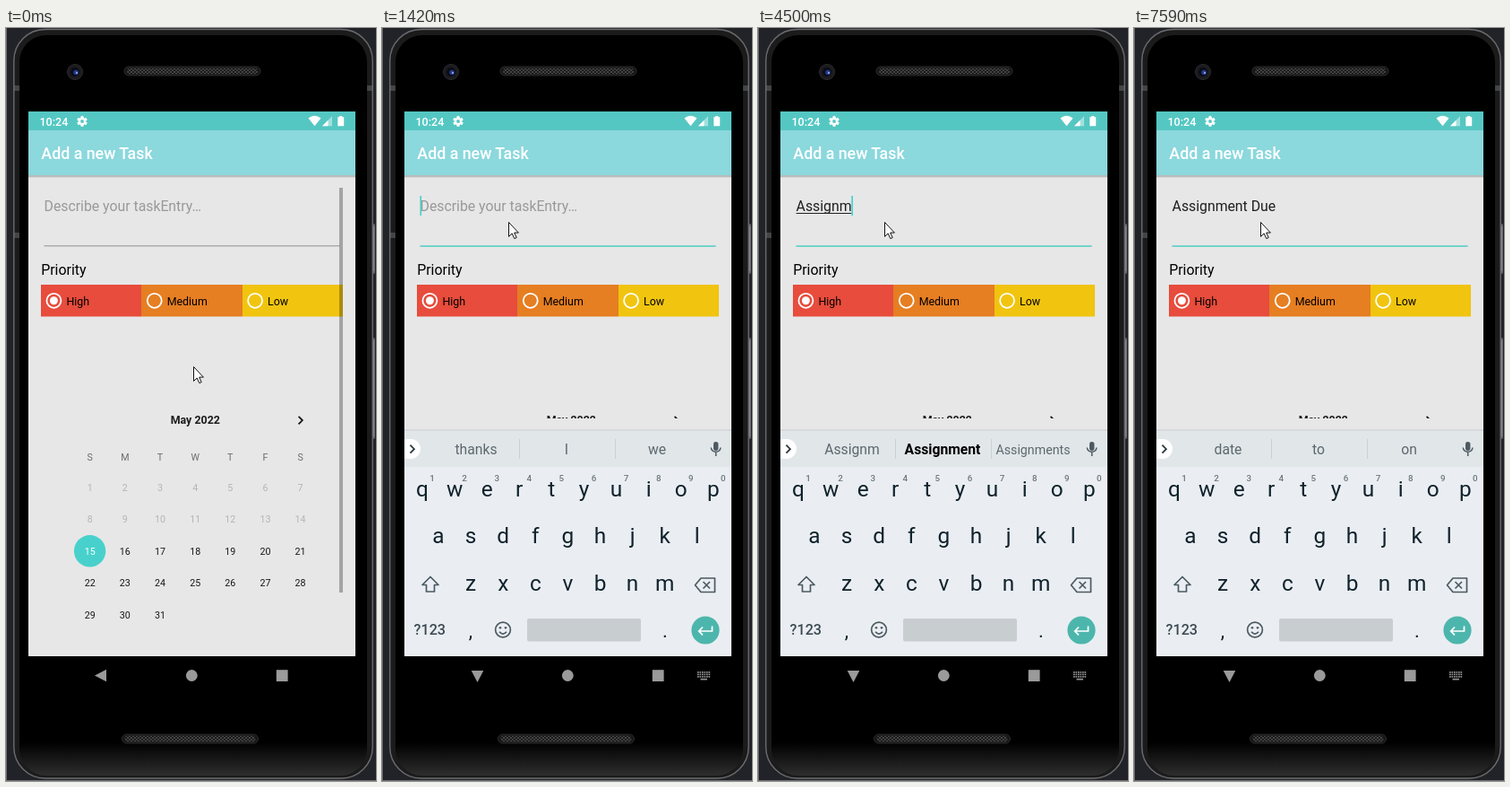
An HTML page for the animation above (8 s loop, 413 px wide and 839 px high).

```html
<!DOCTYPE html>
<html lang="en">
<head>
<meta charset="utf-8">
<title>Add a new Task</title>
<style>
  html, body { margin: 0; width: 100%; height: 100%; overflow: hidden; background: #222329; }
  svg { display: block; width: 413px; height: 839px; }
  text { font-family: Roboto, "Noto Sans", sans-serif; white-space: pre; }
  .mid { text-anchor: middle; }
  .line { fill: none; stroke-width: 1.7; }
</style>
</head>
<body>
<svg id="stage" viewBox="0 0 413 839" xmlns="http://www.w3.org/2000/svg"></svg>
<script>
const LOOP = 8000;
const stage = document.getElementById('stage');

const rect = (x, y, w, h, fill, extra = '') =>
  `<rect x="${x}" y="${y}" width="${w}" height="${h}" fill="${fill}" ${extra}/>`;
const circle = (x, y, r, fill, extra = '') =>
  `<circle cx="${x}" cy="${y}" r="${r}" fill="${fill}" ${extra}/>`;
const path = (d, fill, extra = '') => `<path d="${d}" fill="${fill}" ${extra}/>`;
const line = (d, stroke, extra = '') => `<path class="line" d="${d}" stroke="${stroke}" ${extra}/>`;
const label = (x, y, size, fill, str, extra = '') =>
  `<text x="${x}" y="${y}" font-size="${size}" fill="${fill}" ${extra}>${str}</text>`;
const centred = (x, y, size, fill, str, extra = '') =>
  label(x, y, size, fill, str, `class="mid" ${extra}`);

function phone() {
  const edgeMark = (x, y) => rect(x, y, 6, 6, '#77787a', 'opacity=".45"');
  const speaker = (x, y) =>
    rect(x, y, 152, 10, '#161616', 'rx="5" stroke="#343434" stroke-width=".8"') +
    rect(x + 3, y + 1.5, 146, 7, 'url(#mesh)', 'rx="3.5"');
  const button = (y, h) =>
    rect(406, y, 6, h, '#66676a', 'rx="2"') + rect(408.5, y + 3, 2, h - 6, '#a2a3a5');
  return rect(0, 0, 413, 839, '#222329') +
    rect(0, 0, 1, 839, '#6e6e70') + rect(0, 838, 413, 1, '#6e6e70') +
    button(218, 56) + button(345, 113) +
    rect(8.8, 1.5, 400.4, 834.5, '#1b1b1c', 'rx="35" stroke="#6c6c6e" stroke-width="1.4"') +
    rect(15, 8, 388, 825, 'url(#glass)', 'rx="30"') +
    edgeMark(9, 64) + edgeMark(403, 64) + edgeMark(9, 228) +
    speaker(132, 43) + speaker(129.5, 787) +
    circle(77, 49, 8.5, '#1b1b1d', 'stroke="#2c2c2e"') + circle(77, 49, 5, '#090b18') +
    circle(78, 49.5, 2.8, '#263a85') + circle(79, 50, 1.2, '#7f9bea');
}

function statusBar() {
  let teeth = '';
  for (let a = 0; a < 360; a += 60)
    teeth += rect(83.6, 98.3, 2.8, 11.4, '#fff', `rx=".6" transform="rotate(${a} 85 104)"`);
  return rect(25, 93, 365, 21, '#55c7c2') + rect(25, 114, 365, 50, '#8bd8dd') +
    rect(25, 164, 365, 2, '#b9bdbd') + rect(25, 166, 365, 1, '#d6d7d7') +
    label(37.5, 108.5, 12.5, '#fff', '10:24', 'font-weight="500"') +
    teeth + circle(85, 104, 4.3, '#fff') + circle(85, 104, 1.9, '#55c7c2') +
    path('M337.5 100.5Q344.5 95 351.5 100.5L344.5 109.3Z', '#fff') +
    path('M353 109.2L364 98.2V109.2Z', '#fff', 'opacity=".45"') +
    path('M353 109.2L359.5 102.7V109.2Z', '#fff') +
    path('M370.3 99.3H372.2V98H375.3V99.3H377.2V109.3H370.3Z', '#fff') +
    label(39.3, 146, 17.8, '#fff', 'Add a new Task', 'font-weight="500"');
}

function priorities() {
  const options = [['High', '#e74c3c'], ['Medium', '#e67e22'], ['Low', '#f1c40f']];
  const edge = i => 39 + i * 112.33;
  return label(39.2, 274.6, 15.9, '#000', 'Priority') + options.map(([name, fill], i) => {
    const left = Math.round(edge(i)), x = edge(i) + 14.4;
    return rect(left, 286, Math.round(edge(i + 1)) - left, 35.5, fill) +
      circle(x, 303.8, 8, 'none', 'stroke="#fff" stroke-width="1.78"') +
      (i ? '' : circle(x, 303.8, 4.5, '#fff')) +
      label(x + 14, 308.5, 12.4, '#000', name);
  }).join('');
}

function calendar() {
  const columnX = i => 93.7 + i * 39.15;
  let out = centred(211.3, 441.2, 12.4, '#1c1c1c', 'May 2022', 'font-weight="700"') +
    line('M326.6 432.8L330.9 437.1L326.6 441.4', '#111');
  [...'SMTWTFS'].forEach((d, i) => out += centred(columnX(i), 481.7, 10.7, '#6c6c6c', d));
  out += circle(93.6, 582.8, 17.7, '#48d1cc');
  for (let d = 1; d <= 31; d++) {
    const y = 515.8 + Math.floor((d - 1) / 7) * 35.5;
    const fill = d < 15 ? '#b4b4b4' : d === 15 ? '#fff' : '#161616';
    out += centred(columnX((d - 1) % 7), y, 10.7, fill, d);
  }
  return out;
}

function keyboard() {
  const ink = '#10222c', soft = '#4c5a62', middle = 207.4, pitch = 36.1;
  const keys = (letters, y) => [...letters].map((k, i) =>
    centred(middle + (i - (letters.length - 1) / 2) * pitch, y, 24.4, ink, k)).join('');
  let out = rect(25, 447, 365, 2, '#d6d9db') + rect(25, 449, 365, 251, '#eaeef2') +
    rect(25, 449, 365, 40, '#e1e6e9') +
    path('M25 458H32A11 11 0 0 1 32 480H25Z', '#fff') +
    line('M31.5 464.7L36 469.2L31.5 473.7', '#27333a') +
    rect(153, 458, 1, 22, '#cbd0d3') + rect(260, 458, 1, 22, '#cbd0d3');
  for (let i = 0; i < 3; i++) out += centred(105 + i * 101, 475, 15.7, '#5c686e', '', 'data-suggestion=""');
  out += rect(370, 461, 5.4, 10, soft, 'rx="2.7"') +
    line('M367.3 467.5A5.4 5.4 0 0 0 378 467.5M372.7 473V477', soft, 'style="stroke-width:1.5"');
  out += keys('qwertyuiop', 522.2) + keys('asdfghjkl', 574.3) + keys('zxcvbnm', 627);
  [...'1234567890'].forEach((d, i) =>
    out += centred(56 + i * pitch, 505, 9.8, '#6d777d', d, 'font-weight="500"'));
  out += line('M54 611.5L45 620.5H49.5V628H58.5V620.5H63Z', soft, 'stroke-linejoin="round"') +
    line('M356 613H371.5V628.5H356L349.5 620.7Z', soft, 'stroke-linejoin="round"') +
    line('M358.5 617L366 624.5M366 617L358.5 624.5', soft) +
    label(35.6, 676, 16.2, '#3d4b53', '?123', 'font-weight="500"') +
    centred(99, 679, 22, ink, ',') + centred(316, 679, 22, ink, '.') +
    circle(135, 670.5, 8.4, 'none', `stroke="${soft}" stroke-width="1.7"`) +
    circle(132, 668.3, 1.3, soft) + circle(138, 668.3, 1.3, soft) +
    line('M131 672.8Q135 677.6 139 672.8', soft) +
    rect(162, 658, 127, 25.5, '#c8cdd0', 'rx="2"') +
    circle(361, 671, 15.6, '#4db6ac') +
    line('M368.5 666.5V672H354M358 667.5L353.7 672L358 676.3', '#fff');
  return out;
}

function keyboardIcon() {
  let out = '';
  for (let r = 0; r < 3; r++)
    for (let c = 0; c < 6; c++) out += rect(352 + c * 2.5, 717 + r * 2.5, 1.7, 1.7, '#929292');
  return out + rect(355.5, 724.8, 7.5, 1.7, '#929292');
}

stage.innerHTML = `
  <defs>
    <linearGradient id="glass" x2="0" y2="1">
      <stop offset=".955" stop-color="#000"/><stop offset="1" stop-color="#2e2e2e"/>
    </linearGradient>
    <pattern id="mesh" width="4" height="3.5" patternUnits="userSpaceOnUse">
      <path d="M0 0L2 1.75L4 0M0 3.5L2 1.75L4 3.5" fill="none" stroke="#505050" stroke-width=".8"/>
    </pattern>
    <clipPath id="screenClip"><rect x="25" y="93" width="365" height="607"/></clipPath>
    <clipPath id="calendarClip"><rect id="calendarWindow" x="25" y="322" width="365" height="378"/></clipPath>
  </defs>
  ${phone()}
  <g clip-path="url(#screenClip)">
    ${rect(25, 93, 365, 607, '#e7e7e7')}
    ${statusBar()}
    ${label(42.6, 204, 15.8, '#999', 'Describe your taskEntry…', 'id="hint"')}
    ${label(42.6, 204, 15.8, '#202020', '', 'id="entry"')}
    ${rect(42.6, 206, 0, 1, '#202020', 'id="composing"')}
    ${rect(42.4, 187, 1.7, 22, '#48d1cc', 'id="caret"')}
    ${rect(42.5, 242.2, 330, 1.2, '#a0a0a0', 'id="underline"')}
    ${priorities()}
    <g clip-path="url(#calendarClip)">${calendar()}</g>
    ${rect(372, 178, 4, 451, '#000', 'id="scrollbar"')}
    <g id="keyboard">${keyboard()}</g>
  </g>
  ${path('M99 721.5L112 714.7V728.3Z', '#9a9a9a', 'id="back"')}
  ${circle(207.3, 721.5, 6.4, '#9a9a9a')}
  ${rect(301.8, 715.2, 12.8, 12.8, '#9a9a9a')}
  <g id="switcher">${keyboardIcon()}</g>
  ${path('M.5 .5V16.4L4.2 13L6.8 18.6L9.2 17.6L6.7 12.1H11.4Z', '#fff',
    'id="pointer" stroke="#111" stroke-width="1" stroke-linejoin="round"')}
`;

const el = id => document.getElementById(id);
const set = (id, attrs) => {
  for (const name in attrs) el(id).setAttribute(name, attrs[name]);
};
const show = (id, on) => set(id, { visibility: on ? 'visible' : 'hidden' });
const suggestions = [...document.querySelectorAll('[data-suggestion]')];

const pen = document.createElement('canvas').getContext('2d');
function widthOf(str, size, weight = 400) {
  pen.font = `${weight} ${size}px Roboto, "Noto Sans", sans-serif`;
  return pen.measureText(str).width;
}

const pointerSteps = [
  [0, 209, 377], [120, 190, 326], [240, 150, 232], [360, 133, 184],
  [610, 134, 190], [730, 138, 206], [850, 141, 216]
];

// start time, entry text, three suggestions; "*" marks the bold one
const typing = [
  [0, '', 'thanks|I|we'],
  [2690, 'A', 'A|And|Also'],
  [3500, 'As', 'As|Assignment|Ask'],
  [3800, 'Ass', 'Ass|Assignment|Assignments'],
  [3920, 'Assi', 'Assi|*Assignment|Assist'],
  [4200, 'Assig', 'Assig|*Assignment|Assignments'],
  [4350, 'Assign', 'Assign|*Assignment|Assignments'],
  [4500, 'Assignm', 'Assignm|*Assignment|Assignments'],
  [4750, 'Assignme', 'Assignme|*Assignment|Assignments'],
  [4900, 'Assignmen', 'Assignmen|*Assignment|Assignments'],
  [5020, 'Assignment', 'Assignment|*Assignment|Assignments'],
  [5550, 'Assignment ', 'and|due|for'],
  [6640, 'Assignment D', 'D|Due|Date'],
  [6890, 'Assignment Du', 'Du|Due|During'],
  [7040, 'Assignment Due', 'Due|Due to|Dues'],
  [7190, 'Assignment Due ', 'date|to|on']
];

const caretSteps = [
  [0, false], [1120, true], [1720, false], [2160, true], [3220, false],
  [3500, true], [6090, false], [6520, true], [7590, false]
];

const stepAt = (steps, t) => steps.findLast(step => step[0] <= t);

function drawEntry(t) {
  const [, str, words] = stepAt(typing, t);
  const width = widthOf(str, 15.8);
  const wordStart = str.lastIndexOf(' ') + 1;
  const wordX = widthOf(str.slice(0, wordStart), 15.8);
  el('entry').textContent = str;
  set('composing', { x: 42.6 + wordX, width: Math.max(0, width - wordX) });
  set('caret', { x: 42.4 + width });
  show('caret', stepAt(caretSteps, t)[1]);
  show('hint', !str);
  words.split('|').forEach((word, i) => {
    const bold = word[0] === '*';
    const name = bold ? word.slice(1) : word;
    const node = suggestions[i];
    const fit = Math.min(1, (bold ? 86 : 83) / widthOf(name, 15.7, bold ? 700 : 400));
    node.textContent = name;
    node.setAttribute('font-size', 15.7 * fit);
    node.setAttribute('font-weight', bold ? 700 : 400);
    node.setAttribute('fill', bold ? '#000' : '#5c686e');
  });
}

function draw(t) {
  const [, x, y] = stepAt(pointerSteps, t);
  const focused = t >= 1120, opening = t >= 1270, open = t >= 1420;
  set('pointer', { transform: `translate(${x} ${y})` });
  set('hint', { fill: focused && !opening ? '#707070' : '#999' });
  set('underline', focused
    ? { fill: '#4dcebf', y: 242.3, height: 1.5 }
    : { fill: '#a0a0a0', y: 242.2, height: 1.2 });
  set('scrollbar', { opacity: opening ? 0 : focused ? .11 : .29 });
  set('calendarWindow', { height: open ? 113 : 378 });
  show('keyboard', opening);
  set('keyboard', { transform: `translate(0 ${open ? 0 : 60})` });
  set('back', { transform: open ? 'translate(1 1) rotate(-90 105.5 721.5)'
    : opening ? 'rotate(-45 105.5 721.5)' : '' });
  set('switcher', { opacity: open ? 1 : opening ? .5 : 0 });
  drawEntry(t);
}

const start = performance.now();
function tick() {
  draw((performance.now() - start) % LOOP);
  requestAnimationFrame(tick);
}
tick();
</script>
</body>
</html>
```
